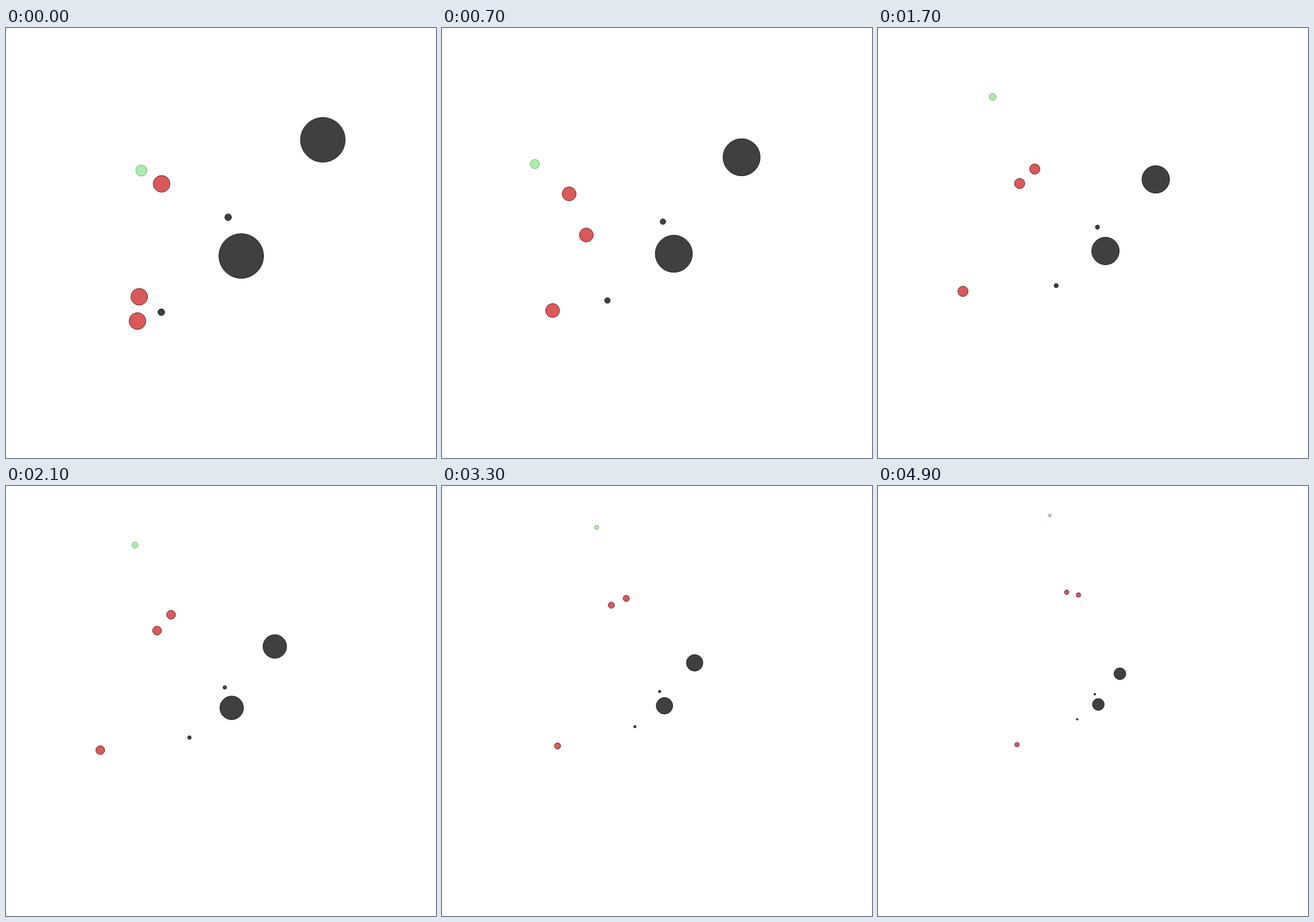
Write an HTML page without scripts that moves like this. It is 700x700 px and loops after 5000 ms.

```html
<!DOCTYPE html>
<html lang="en">
<head>
<meta charset="utf-8">
<title>Pursuit</title>
<style>
@property --x { syntax: "<number>"; inherits: true; initial-value: 0; }
@property --y { syntax: "<number>"; inherits: true; initial-value: 0; }

html, body { margin: 0; width: 100%; height: 100%; overflow: hidden; background: #fff; }

/* World units; the camera backs off to keep the runner in view. */
svg {
  display: block; width: 100%; height: 100%;
  --k: calc(350 / (1 + max(.923, -1 * var(--x), -1 * var(--y))));
}
circle {
  cx: calc(var(--k) * var(--x) * 1px);
  cy: calc(var(--k) * var(--y) * 1px);
  r: calc(var(--k) * var(--r) * 1px);
  stroke-width: 1px;
}
.rock, .food { fill: #404040; stroke: #202020; }
.rock { --r: .2; }
.food { --r: .03; }
.prey { --r: .05; fill: #59d959; stroke: #2c6c2c; fill-opacity: .5; stroke-opacity: .5; }
.hunter { --r: .075; fill: #d95959; stroke: #6c2c2c; }

/* One tick is 100 ms (2%); steps() holds the pose for each tick. */
svg, .hunter { animation: 5s -4ms infinite; }
svg { animation-name: run; }
.a { animation-name: a; }
.b { animation-name: b; }
.c { animation-name: c; }

@keyframes run {
  0%   { --x: -.712;  --y: -.648; animation-timing-function: steps(4); }
  8%   { --x: -1.13;  --y: -.648; animation-timing-function: steps(1); }
  10%  { --x: -1.21;  --y: -.688; animation-timing-function: steps(1); }
  12%  { --x: -1.27;  --y: -.758; animation-timing-function: steps(1); }
  14%  { --x: -1.315; --y: -.85;  animation-timing-function: steps(2); }
  18%  { --x: -1.373; --y: -1.08; animation-timing-function: steps(3); }
  24%  { --x: -1.425; --y: -1.47; animation-timing-function: steps(5); }
  34%  { --x: -1.457; --y: -2.12; animation-timing-function: steps(33); }
  100% { --x: -1.462; --y: -6.41; }
}
@keyframes a {
  0%   { --x: -.531;  --y: -.529;  animation-timing-function: steps(7); }
  14%  { --x: -.946;  --y: -.529;  animation-timing-function: steps(3); }
  20%  { --x: -1.02;  --y: -.58;   animation-timing-function: steps(7); }
  34%  { --x: -1.064; --y: -.863;  animation-timing-function: steps(8); }
  50%  { --x: -1.102; --y: -1.52;  animation-timing-function: steps(8); }
  66%  { --x: -1.104; --y: -2.317; animation-timing-function: steps(8); }
  82%  { --x: -1.054; --y: -3.082; animation-timing-function: steps(9); }
  100% { --x: -.87;   --y: -3.758; }
}
@keyframes b {
  0%   { --x: -.731; --y: .481;   animation-timing-function: steps(7); }
  14%  { --x: -.761; --y: -.086;  animation-timing-function: steps(10); }
  34%  { --x: -.845; --y: -1.073; animation-timing-function: steps(8); }
  50%  { --x: -.846; --y: -1.847; animation-timing-function: steps(8); }
  66%  { --x: -.744; --y: -2.481; animation-timing-function: steps(8); }
  82%  { --x: -.691; --y: -3.079; animation-timing-function: steps(9); }
  100% { --x: -.465; --y: -3.656; }
}
@keyframes c {
  0%   { --x: -.747;  --y: .698;  animation-timing-function: steps(7); }
  14%  { --x: -1.124; --y: .727;  animation-timing-function: steps(5); }
  24%  { --x: -1.49;  --y: .7;    animation-timing-function: steps(2); }
  28%  { --x: -1.68;  --y: .7;    animation-timing-function: steps(3); }
  34%  { --x: -1.887; --y: .702;  animation-timing-function: steps(8); }
  50%  { --x: -2.201; --y: .962;  animation-timing-function: steps(5); }
  60%  { --x: -2.292; --y: 1.06;  animation-timing-function: steps(3); }
  66%  { --x: -2.406; --y: 1.086; animation-timing-function: steps(3); }
  72%  { --x: -2.57;  --y: 1.19;  animation-timing-function: steps(5); }
  82%  { --x: -2.655; --y: 1.277; animation-timing-function: steps(9); }
  100% { --x: -2.563; --y: 1.504; }
}
</style>
</head>
<body>
<svg viewBox="-350 -350 700 700">
  <circle class="hunter a"/>
  <circle class="hunter b"/>
  <circle class="hunter c"/>
  <circle class="prey"/>
  <circle class="rock" style="--x: .911; --y: -.923"/>
  <circle class="rock" style="--x: .181; --y: .116"/>
  <circle class="food" style="--x: .064; --y: -.23"/>
  <circle class="food" style="--x: -.534; --y: .619"/>
</svg>
</body>
</html>
```
